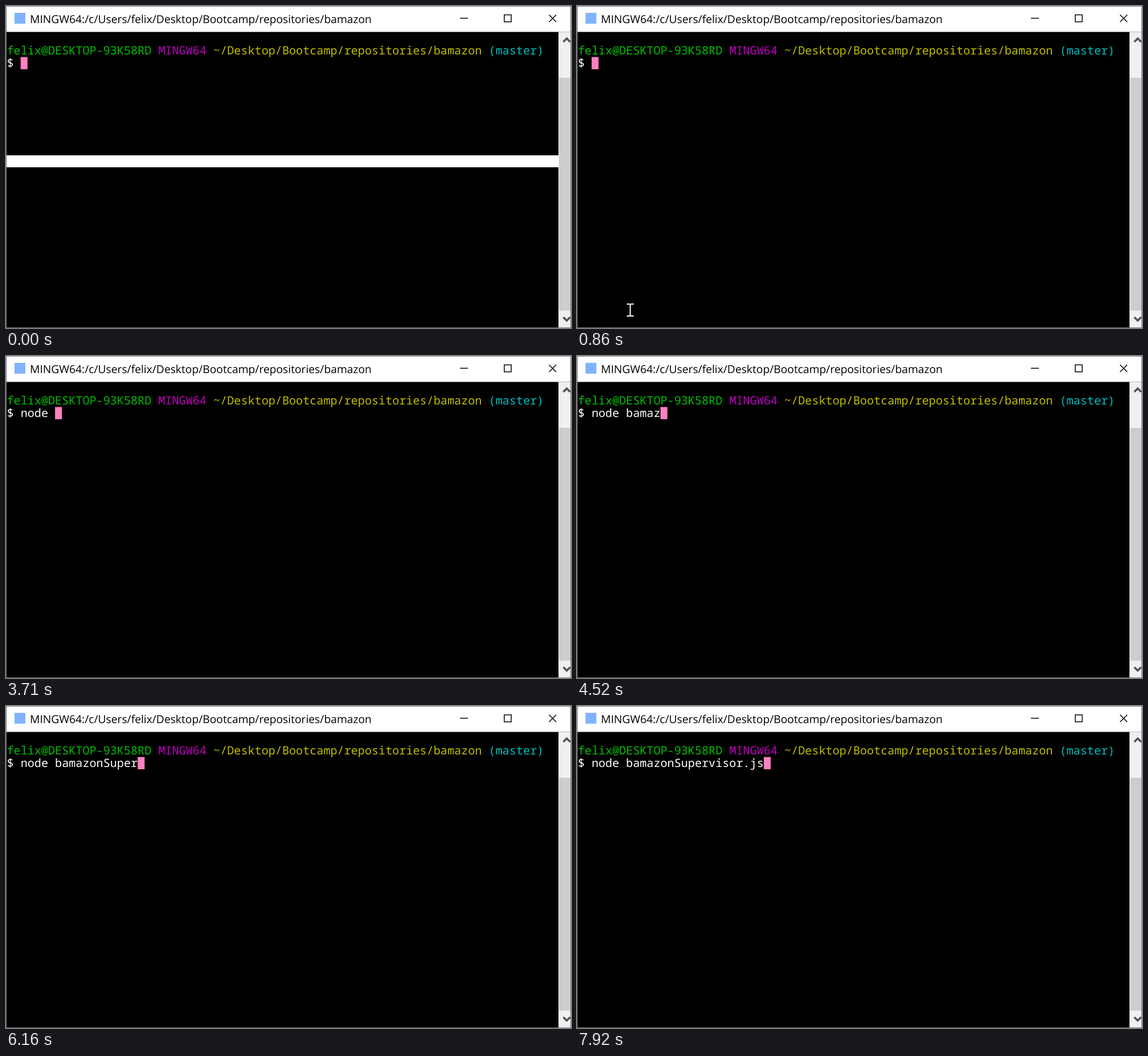
An HTML page for the animation above (8 s loop, 992 by 565 pixels).

```html
<!DOCTYPE html>
<html lang="en">
<head>
<meta charset="utf-8">
<title>Terminal</title>
<style>
  html, body { margin: 0; width: 100%; height: 100%; overflow: hidden; background: #000; }
  svg { display: block; }
  text { white-space: pre; text-rendering: geometricPrecision; }
  .title { font: 19.26px "Open Sans", "Noto Sans", sans-serif; }
  .term { font: 20.15px "Noto Sans Mono", "DejaVu Sans Mono", monospace; fill: #fff; }
  .line { fill: none; stroke: #000; stroke-width: 1.5; }
  .arrow { fill: none; stroke: #505050; stroke-width: 3.4; }
</style>
</head>
<body>
<svg width="992" height="565" viewBox="0 0 992 565">
  <rect width="992" height="565"/>

  <!-- title bar -->
  <rect width="992" height="45.5" fill="#fff"/>
  <rect x="15" y="12" width="19" height="19" fill="#80b3ff"/>
  <text class="title" x="42" y="30">MINGW64:/c/Users/felix/Desktop/Bootcamp/repositories/bamazon</text>
  <path class="line" d="M797 21.5h14M874.8 15.5h12.2v12.2h-12.2zM953.5 15.5l12.5 12.5m0-12.5l-12.5 12.5"/>

  <!-- scrollbar -->
  <rect x="970" y="45.5" width="22" height="519" fill="#f0f0f0"/>
  <rect x="971" y="126" width="21" height="408.5" fill="#cdcdcd"/>
  <path class="arrow" d="M978.5 63l6-6 6 6M978.5 546l6 6 6-6"/>

  <!-- terminal -->
  <rect id="divider" x="1" y="262" width="969" height="21" fill="#fff"/>
  <text class="term" x="1.5" y="85"><tspan fill="#00bf00">felix@DESKTOP-93K58RD</tspan> <tspan fill="#bf00bf">MINGW64</tspan> <tspan fill="#bfbf00">~/Desktop/Bootcamp/repositories/bamazon</tspan> <tspan fill="#00bfbf">(master)</tspan></text>
  <text class="term" id="prompt" x="1.5" y="106.5">$ </text>
  <rect id="cursor" y="89.5" width="12.1" height="21.5" fill="#ff80c0"/>
  <path id="pointer" d="M-6 523h4q2 0 2 2q0-2 2-2h4M0 525v17M-6 544h4q2 0 2-2q0 2 2 2h4" fill="none" stroke="#fff" stroke-width="2"/>

  <!-- window edge -->
  <path d="M0 .5H992M.5 0V565M991.5 0V565M0 564.5H992" stroke="#777" fill="none"/>
</svg>
<script>
  const LOOP = 8000, CELL = 12.09, LEFT = 1.5;
  const command = "node bamazonSupervisor.js";

  // [time in ms, characters typed by then]
  const typed = [
    [1960, 1], [2090, 2], [2210, 3], [2890, 4], [3710, 5], [3850, 6], [3980, 7],
    [4250, 9], [4520, 10], [4660, 11], [4780, 12], [5190, 13], [5740, 14],
    [5880, 15], [6010, 16], [6160, 17], [6840, 18], [6970, 19], [7260, 21],
    [7400, 22], [7660, 23], [7920, 25]
  ];
  const cursorOff = [[430, 860], [1420, 1960], [3290, 3560]];

  const byId = id => document.getElementById(id);
  const [divider, prompt, cursor, pointer] =
    ["divider", "prompt", "cursor", "pointer"].map(byId);
  const within = (t, [from, to]) => t >= from && t < to;
  const show = (el, on) => el.setAttribute("visibility", on ? "visible" : "hidden");

  function draw(t) {
    const count = typed.reduce((n, [at, chars]) => t >= at ? chars : n, 0);
    prompt.textContent = "$ " + command.slice(0, count);
    cursor.setAttribute("x", LEFT + (count + 2) * CELL);
    show(cursor, !cursorOff.some(span => within(t, span)));
    show(divider, t < 860);
    show(pointer, within(t, [720, 990]));
    pointer.setAttribute("transform", `translate(${t < 860 ? 99.5 : 93.5})`);
  }

  const start = performance.now();
  function tick() {
    draw((performance.now() - start) % LOOP);
    requestAnimationFrame(tick);
  }
  tick();
</script>
</body>
</html>
```
